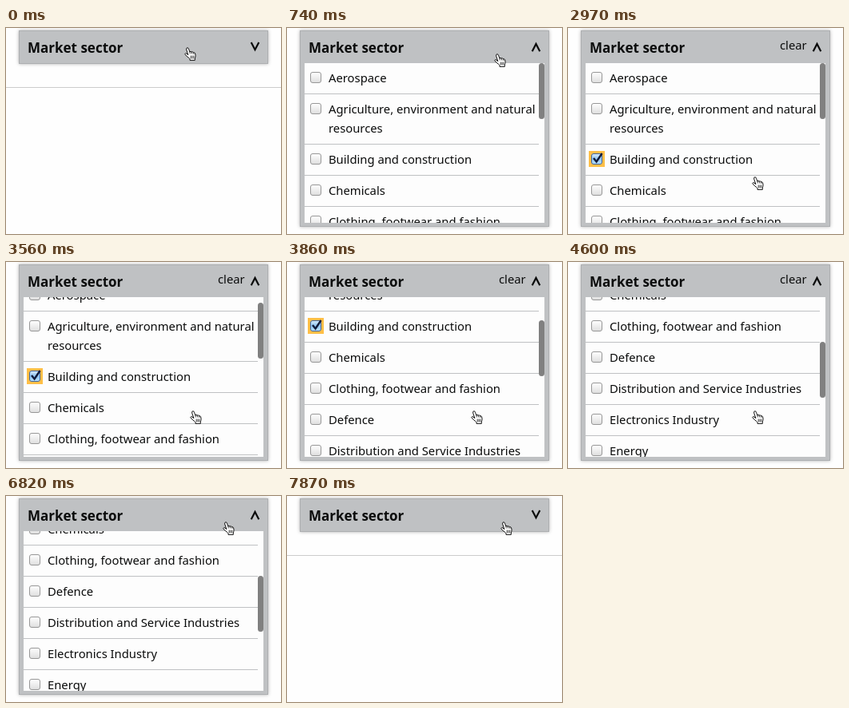
Animation of 344 by 258 pixels, one loop 8000 ms. Source, as an HTML page:

```html
<!DOCTYPE html>
<html lang="en">
<head>
<meta charset="utf-8">
<title>Market sector filter</title>
<style>
  html, body { margin: 0; width: 100%; height: 100%; overflow: hidden; background: #fefefe; }
  svg { display: block; width: 100%; height: 100%; }
  text { font: 14.8px "Noto Sans", "Open Sans", sans-serif; fill: #0b0c0c; }
  .title { font-size: 17px; font-weight: 700; }
  .rule { fill: #bfc1c3; }
</style>
</head>
<body>
<svg viewBox="0 0 344 258">
  <defs>
    <linearGradient id="plain" x2="0" y2="1">
      <stop stop-color="#fff"/><stop offset="1" stop-color="#dedede"/>
    </linearGradient>
    <linearGradient id="blue" x2="0" y2="1">
      <stop stop-color="#d9ecfa"/><stop offset=".5" stop-color="#8fc3f0"/><stop offset="1" stop-color="#b9e2fb"/>
    </linearGradient>
    <linearGradient id="pressed" x2="0" y2="1">
      <stop stop-color="#b4b4b4"/><stop offset="1" stop-color="#d2d2d2"/>
    </linearGradient>
    <filter id="shadow" x="-10%" y="-30%" width="120%" height="160%">
      <feDropShadow dx="0" dy="0" stdDeviation="2.2" flood-color="#000" flood-opacity=".3"/>
    </filter>
    <clipPath id="window"><rect x="22" y="44" width="300" height="200"/></clipPath>
  </defs>
  <rect id="divider" y="74" width="344" height="1" fill="#ccc"/>
  <rect id="panel" x="16.5" y="3.5" width="311" height="41" fill="#bfc1c3" stroke="#adafb1" filter="url(#shadow)"/>
  <text class="title" x="27" y="30.5">Market sector</text>
  <text id="clear" x="265" y="27">clear</text>
  <path id="arrow" fill="none" stroke="#0b0c0c" stroke-width="2.2"/>
  <g id="list" clip-path="url(#window)">
    <rect x="22" y="44" width="300" height="200" fill="#fdfdfd"/>
    <g id="rows"></g>
    <rect id="thumb" x="315" width="7" height="70" rx="3.5" fill="#808080"/>
  </g>
  <g id="cursor" stroke="#111" stroke-linejoin="round" stroke-linecap="round">
    <path fill="#fff" d="M2.6 2.6Q2.4.7 4 .7Q5 .8 5.5 2.2L6.8 5.8Q8.1 4.9 9.1 6.1Q10.5 5.3 11.4 6.7Q13 6.2 13.6 8Q14.4 10.2 13.9 12.2L13.3 14V16.4H7V14.8Q6 13.2 3.8 12Q1.1 9.6.8 8.4Q1.3 7 3 8L4.6 9.4Z"/>
    <path fill="none" stroke-width=".8" d="M6.8 5.8L7.3 8M9.1 6.1L9.6 8.1M11.4 6.7L11.8 8.4M8.2 11V14M10 11V14M11.8 11V14"/>
  </g>
</svg>
<script>
const LOOP = 8000, TICK = 146;
const el = id => document.getElementById(id);
const show = (node, on) => node.setAttribute('visibility', on ? 'inherit' : 'hidden');

const sectors = [
  ['Aerospace'],
  ['Agriculture, environment and natural', 'resources'],
  ['Building and construction'],
  ['Chemicals'],
  ['Clothing, footwear and fashion'],
  ['Defence'],
  ['Distribution and Service Industries'],
  ['Electronics Industry'],
  ['Energy']
];
const BUILDING = 2, ELECTRONICS = 7;

// Each move: start time, number of held steps, destination.
const cursorMoves = [
  [150, 1, 259, 32], [1190, 3, 230, 109], [1940, 1, 230, 127], [2090, 1, 230, 158],
  [2820, 1, 230, 172], [2970, 1, 230, 186], [5340, 7, 271, 15], [6380, 1, 271, 21],
  [6820, 1, 271, 32], [6970, 1, 269, 58], [7120, 1, 267, 75], [7270, 1, 264, 50],
  [7420, 1, 267, 32]
];
const scrollMoves = [[3420, 4, 84], [4010, 1, 92], [4300, 3, 162]];

function sample(moves, start, time) {
  let at = start;
  for (const [begin, steps, ...to] of moves) {
    if (time < begin) break;
    const part = Math.min(steps, Math.floor((time - begin) / TICK) + 1) / steps;
    at = at.map((v, i) => v + (to[i] - v) * part);
  }
  return at;
}

function rowMarkup(lines, y, height) {
  const texts = lines.map((line, i) => `<text x="52" y="${24 + 24 * i}">${line}</text>`);
  return `<g transform="translate(0 ${y})">
    <rect class="focus" x="26" y="8" width="20" height="20" fill="#ffbf47"/>
    <rect class="box" x="29.5" y="11.5" width="13" height="13" rx="2.5"/>
    <path class="tick" d="M32 17L35.6 21.5L42.6 11" fill="none" stroke="#111b3a" stroke-width="2.4"/>
    ${texts.join('')}
    <rect class="rule" x="22" y="${height - 1}" width="293" height="1"/>
  </g>`;
}

let rowTop = 43;
el('rows').innerHTML = sectors.map(lines => {
  const height = 15 + 24 * lines.length;
  rowTop += height;
  return rowMarkup(lines, rowTop - height + 1, height);
}).join('');

const boxes = [...el('rows').children].map(row => ({
  focus: row.querySelector('.focus'),
  box: row.querySelector('.box'),
  tick: row.querySelector('.tick')
}));

const boxColours = {
  off: ['plain', '#979797'], pressed: ['pressed', '#777'], on: ['blue', '#41659b']
};

function setBox({ focus, box, tick }, state, focused) {
  const [fill, stroke] = boxColours[state];
  box.setAttribute('fill', `url(#${fill})`);
  box.setAttribute('stroke', stroke);
  show(tick, state === 'on');
  show(focus, focused);
}

function draw(time) {
  const within = (from, to) => time >= from && time < to;
  const open = within(740, 7870);
  const stateFor = press => within(press, press + 140) ? 'pressed'
    : within(press + 140, 6520) ? 'on' : 'off';

  show(el('divider'), !open);
  show(el('list'), open);
  show(el('clear'), within(2520, 6520));
  el('panel').setAttribute('height', open ? 245 : 41);
  el('arrow').setAttribute('d', open ? 'M306.7 29.2L311.5 20L316.3 29.2' : 'M306.7 18L311.5 27.2L316.3 18');

  boxes.forEach((box, i) => {
    if (i === BUILDING) setBox(box, stateFor(2380), within(2520, 4900));
    else if (i === ELECTRONICS) setBox(box, stateFor(4900), within(5040, 6380));
    else setBox(box, 'off', false);
  });

  const [scroll] = sample(scrollMoves, [0], time);
  el('rows').setAttribute('transform', `translate(0 ${-Math.round(scroll)})`);
  el('thumb').setAttribute('y', 44 + Math.round(scroll * 0.346));

  const [x, y] = sample(cursorMoves, [223, 24], time).map(Math.round);
  el('cursor').setAttribute('transform', `translate(${x} ${y})`);
}

let began;
function frame(now) {
  began ??= now;
  draw((now - began) % LOOP);
  requestAnimationFrame(frame);
}
draw(0);
requestAnimationFrame(frame);
</script>
</body>
</html>
```
